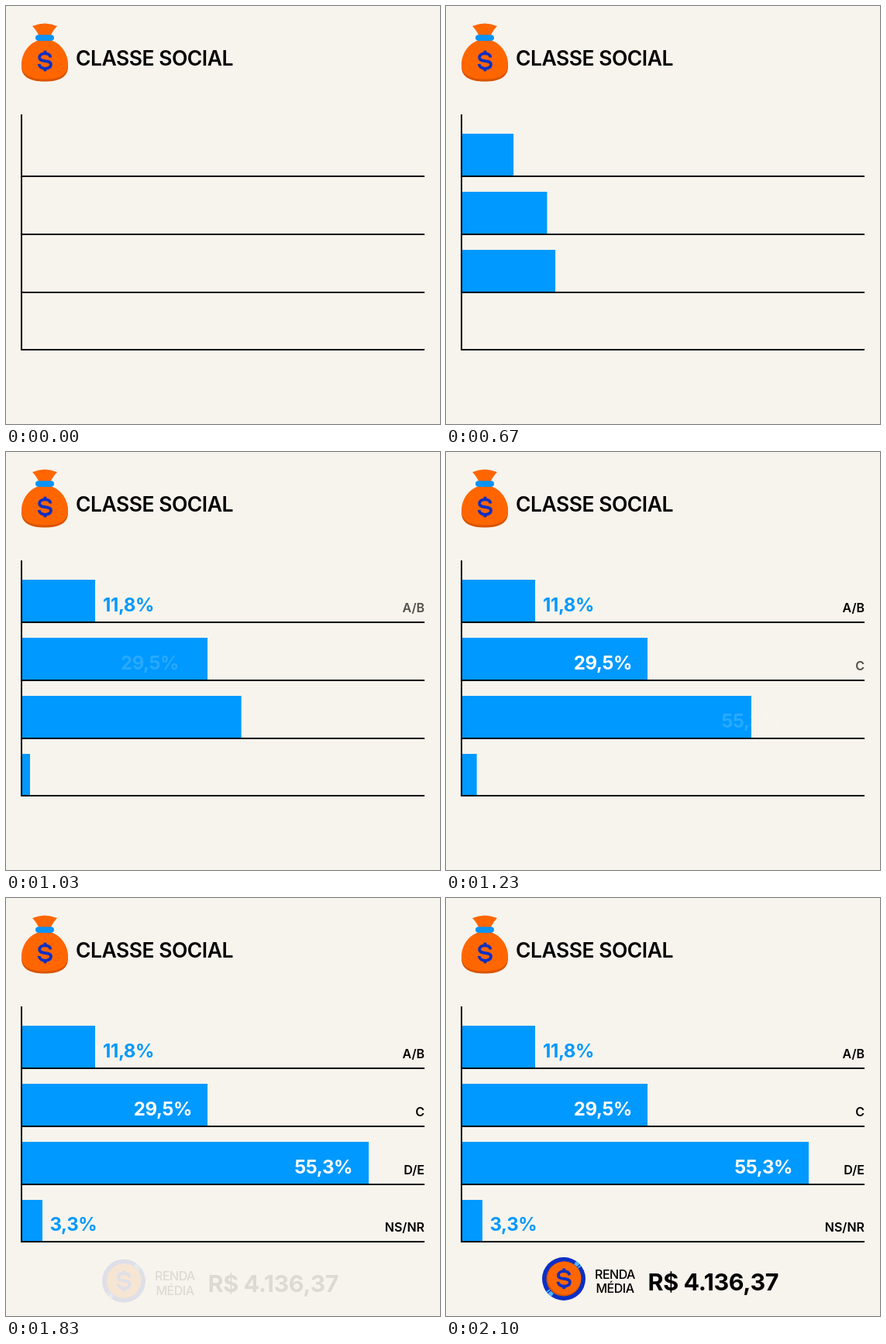
Animation, 560 px wide and 540 px high, one loop 2.16 s. Source, as an HTML page:

```html
<!DOCTYPE html>
<html lang="pt">
<head>
<meta charset="utf-8">
<title>Classe social</title>
<style>
  html, body { margin: 0; width: 100%; height: 100%; overflow: hidden; background: #f7f4ed; }
  svg { display: block; width: 560px; height: 540px; font-family: Inter, Roboto, sans-serif; }
  .title { font-size: 26.5px; font-weight: 600; letter-spacing: -.5px; }
  .value { font-size: 24px; font-weight: 700; letter-spacing: -.4px; }
  .label { font-size: 16px; font-weight: 600; text-anchor: end; }
  .small { font-size: 16px; font-weight: 500; letter-spacing: -.5px; text-anchor: middle; }
  .total { font-size: 30.5px; font-weight: 700; letter-spacing: -.4px; }
  .line { fill: none; stroke: #000; stroke-width: 2; }
</style>
</head>
<body>
<svg viewBox="0 0 560 540">
  <defs>
    <g id="dollar" fill="none" stroke="#0c2fc4" stroke-width="3.8">
      <path d="M7.3 -4.6C6.8 -8.2 3.6 -9.6 .1 -9.6C-4.2 -9.6 -7 -7.4 -7 -4.4C-7 2.8 7.8 -2.4 7.8 4.6C7.8 7.8 4.6 9.8 .4 9.8C-4 9.8 -7.2 7.6 -7.6 4"/>
      <path d="M.2 -13.2V-9M.2 9V13.2"/>
    </g>
    <path id="sack" d="M50 43C68 43 80 60 80 75C80 89 69 94.5 50 94.5S20 89 20 75C20 60 32 43 50 43Z"/>
  </defs>

  <path d="M34 26Q50 19 66 26Q60 32 57.5 39H42.5Q40 32 34 26Z" fill="#f60"/>
  <use href="#sack" y="3" fill="#d95400"/>
  <use href="#sack" fill="#f60"/>
  <rect x="38" y="37.3" width="24" height="7.6" rx="3.8" fill="#0a93f5"/>
  <use href="#dollar" x="50.2" y="71"/>
  <text class="title" x="90" y="76.5">CLASSE SOCIAL</text>

  <g id="chart"></g>
  <path class="line" d="M20 140V445M20 220H540M20 295H540M20 370H540M20 444H540"/>

  <g id="income">
    <circle cx="152" cy="492" r="28" fill="#0c2fc4"/>
    <circle cx="152" cy="492" r="25.5" fill="none" stroke="#4db5ff" stroke-width="5"
      pathLength="360" stroke-dasharray="12 3 4 161" stroke-dashoffset="-125"/>
    <circle cx="152" cy="492" r="22.5" fill="#d95400"/>
    <circle cx="152.8" cy="491" r="21.5" fill="#f60"/>
    <use href="#dollar" x="152" y="491.8"/>
    <text class="small" x="218" y="491.7">RENDA</text>
    <text class="small" x="218" y="510">MÉDIA</text>
    <text class="total" x="260.5" y="506.5">R$ 4.136,37</text>
  </g>
</svg>
<script>
const LOOP = 2160, LEFT = 21, FADE = 200;
const BLUE = '#0099ff';

// grow: [time, share of full width]
const rows = [
  { name: 'A/B', value: '11,8%', y: 165, h: 54, width: 94, x: 125, slide: 20, fill: BLUE,
    grow: [[85, 0], [470, .436], [870, .968], [895, 1]] },
  { name: 'C', value: '29,5%', y: 240, h: 54, width: 239, x: 240, anchor: 'end', slide: 20, fill: '#fff',
    grow: [[383, 0], [1012, 1]] },
  { name: 'D/E', value: '55,3%', y: 315, h: 54, width: 447, x: 447, anchor: 'end', slide: 20, fill: '#fff',
    grow: [[405, 0], [1395, 1]] },
  { name: 'NS/NR', value: '3,3%', y: 390, h: 53, width: 26, x: 56.5, slide: 0, fill: BLUE,
    grow: [[800, 0], [1400, 1]] }
];

const chart = document.getElementById('chart');
const income = document.getElementById('income');

function add(tag, attrs, text = '') {
  const el = document.createElementNS('http://www.w3.org/2000/svg', tag);
  for (const key in attrs) el.setAttribute(key, attrs[key]);
  el.textContent = text;
  return chart.appendChild(el);
}

rows.forEach((row, i) => {
  const base = row.y + row.h;
  row.bar = add('rect', { x: LEFT, y: row.y, height: row.h, width: 0, fill: BLUE });
  row.text = add('text', { class: 'value', x: row.x, y: base - 13.2, fill: row.fill,
    'text-anchor': row.anchor || 'start' }, row.value);
  row.label = add('text', { class: 'label', x: 540, y: base - 11.8 }, row.name);
  row.textStart = 800 + i * 200;
  row.labelStart = 895 + i * 200;
});

const ramp = (t, start, length) => Math.min(1, Math.max(0, (t - start) / length));

function along(points, t) {
  let v = points[0][1];
  for (let i = 1; i < points.length; i++) {
    const [t0, v0] = points[i - 1], [t1, v1] = points[i];
    v += (v1 - v0) * ramp(t, t0, t1 - t0);
  }
  return v;
}

function draw(t) {
  for (const row of rows) {
    const shown = ramp(t, row.textStart, FADE);
    row.bar.setAttribute('width', t < 100 ? 0 : row.width * along(row.grow, t));
    row.text.setAttribute('opacity', shown);
    row.text.setAttribute('x', row.x - row.slide * (1 - shown));
    row.label.setAttribute('opacity', ramp(t, row.labelStart, FADE));
  }
  const shown = ramp(t, 1800, 300);
  income.setAttribute('opacity', shown);
  income.setAttribute('transform', `translate(0 ${3 * (1 - shown)})`);
}

function tick() {
  draw(performance.now() % LOOP);
  requestAnimationFrame(tick);
}
tick();
</script>
</body>
</html>
```
